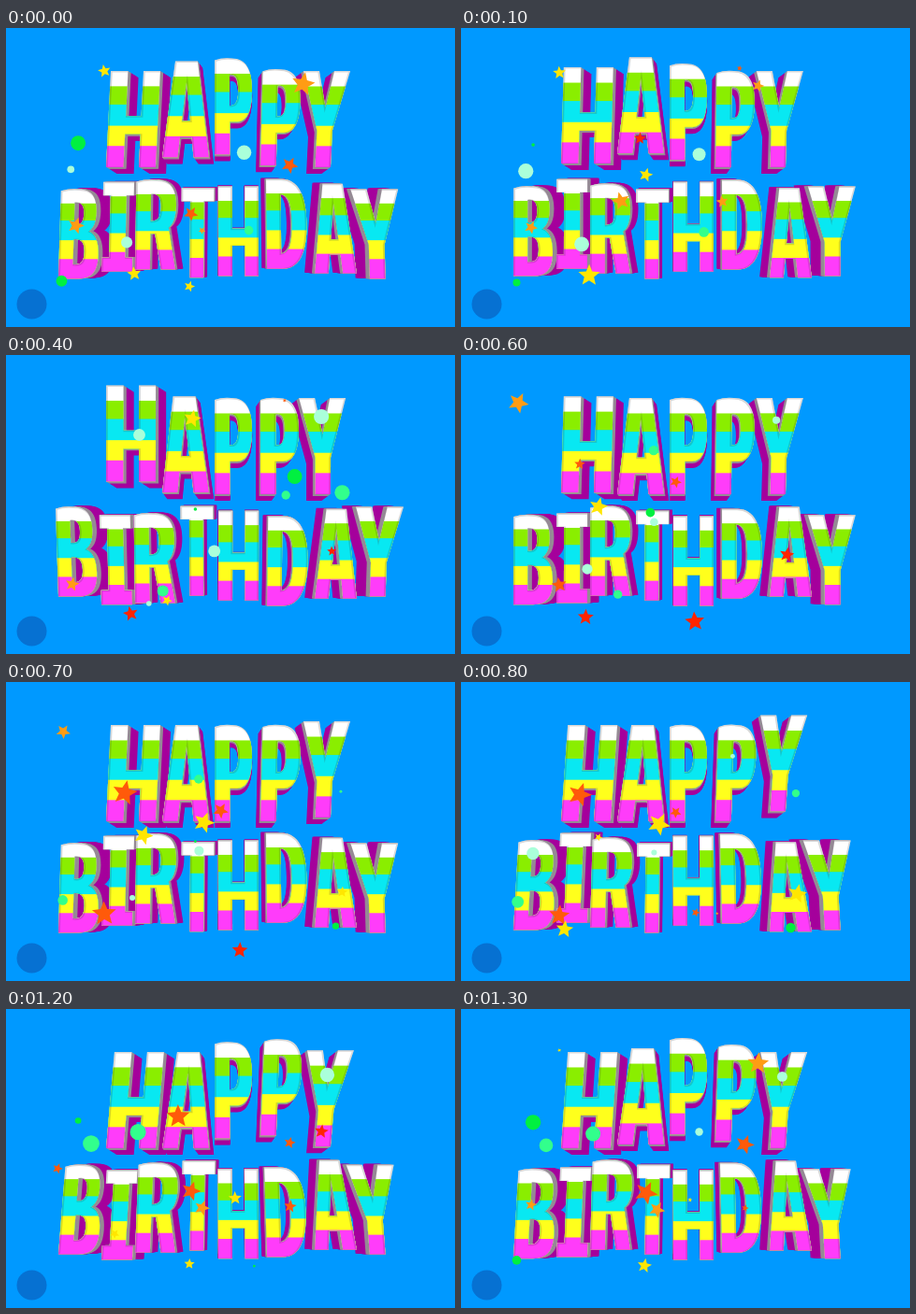
These frames come from a looping animation (480x320 px, 1.4 s). An HTML page with a canvas:

```html
<!DOCTYPE html>
<html>
<head>
<meta charset="utf-8">
<title>Happy Birthday</title>
<style>
html, body { margin: 0; width: 100%; height: 100%; overflow: hidden; background: #09f; }
canvas { display: block; }
</style>
</head>
<body>
<canvas id="stage" width="480" height="320" aria-label="Happy Birthday"></canvas>
<script>
const ctx = document.getElementById('stage').getContext('2d');
const { PI, cos, sin, abs } = Math;
const LOOP = 1400, STEP = 100;

// Letter outlines in a 100 x 100 box
const glyphs = {
  H: 'M0 0H35V47H66V0H100V100H66V66H35V100H0Z',
  A: 'M23 0H71L100 100H67L62 79H37L33 100H0ZM48 22L40 62H58Z',
  P: 'M0 2Q20 -1 45 0C85 0 100 12 100 33C100 55 85 66 60 66H41V100H0ZM40 17V49C58 50 63 43 63 33C63 20 55 16 40 17Z',
  Y: 'M0 0H34L51 38L66 0H100L68 62V100H35V62Z',
  B: 'M0 2Q20 -1 45 0C80 0 92 10 92 25C92 38 84 44 74 47C90 50 100 58 100 73C100 92 85 100 50 100H0ZM36 15V40C55 41 60 36 60 27C60 18 52 14 36 15ZM36 56V84C58 85 64 80 64 70C64 60 56 55 36 56Z',
  I: 'M0 0H100V15H76V84H100V100H0V84H24V15H0Z',
  R: 'M0 2Q20 -1 50 0C85 0 100 10 100 28C100 42 92 50 82 53L100 100H64L48 60H37V100H0ZM37 16V46C56 46 62 42 62 30C62 19 54 15 37 16Z',
  T: 'M0 0H100V15H69V100H27V15H0Z',
  D: 'M0 0H40C80 0 100 18 100 50C100 82 80 100 40 100H0ZM36 17V83C56 82 63 72 63 50C63 28 56 18 36 17Z'
};
for (const ch in glyphs) glyphs[ch] = new Path2D(glyphs[ch]);

// Each row: left edges, widths, resting top, height of the hop, lean of the top edge
const rows = [
  {
    text: 'HAPPY', xs: [107, 167, 223, 272, 313], ws: [53, 50, 40, 41, 50],
    y: 46, h: 103, hop: 15, once: true, depth: 7,
    lean: (i, mid, tilt) => 5 * abs(i - 2) * tilt
  },
  {
    text: 'BIRTHDAY', xs: [56, 102, 138, 187, 227, 279, 330, 371], ws: [42, 33, 43, 35, 43, 43, 45, 51],
    y: 172.5, h: 96, hop: 11, once: false, depth: -1,
    lean: (i, mid, tilt) => (238 - mid) * (0.075 * tilt - 0.02)
  }
];

const bands = [
  [-3, '#fff'], [16, '#8aee00'], [35, '#08e8f2'], [57, '#ffff1c'], [78, '#ff3cfa']
];
const discColors = ['#00f040', '#32ff8c', '#aaffda'];
const starColors = ['#ffe600', '#ff9c14', '#ff5a0a', '#ff2400'];

let seed = 11;
const random = () => (seed = seed * 16807 % 2147483647) / 2147483647;
const between = (a, b) => a + (b - a) * random();
const pick = list => list[Math.floor(random() * list.length)];

const confetti = Array.from({ length: 65 }, (_, i) => {
  const isStar = random() < 0.55;
  return {
    isStar,
    x: between(55, 360), y: between(40, 285),
    r: isStar ? between(7, 15) : between(4, 9),
    fill: pick(isStar ? starColors : discColors),
    turn: between(-0.4, 0.4),
    birth: i / 65 * LOOP
  };
});

function disc(x, y, r, fill) {
  ctx.fillStyle = fill;
  ctx.beginPath();
  ctx.arc(x, y, r, 0, 2 * PI);
  ctx.fill();
}

function star(x, y, r, turn, fill) {
  ctx.fillStyle = fill;
  ctx.beginPath();
  for (let i = 0; i < 10; i++) {
    const a = turn + i * PI / 5 - PI / 2;
    const d = i % 2 ? r * 0.45 : r;
    ctx.lineTo(x + d * cos(a), y + d * sin(a));
  }
  ctx.fill();
}

// The hop runs through each row from right to left
function lift(t, i, once) {
  const peak = 330 - 200 * i;
  const off = (t - peak + 2.5 * LOOP) % LOOP - LOOP / 2;
  return once && abs(off) > 350 ? 0 : (1 + cos(2 * PI * off / 700)) / 2;
}

function shapeRow(row, t, tilt) {
  return [...row.text].map((ch, i) => {
    const w = row.ws[i], mid = row.xs[i] + w / 2;
    const y = row.y - row.hop * lift(t, i, row.once);
    const lean = row.lean(i, mid, tilt);
    const path = new Path2D();
    path.addPath(glyphs[ch], new DOMMatrix([w / 100, 0, -lean / 100, row.h / 100, row.xs[i] + lean, y]));
    return { path, y, h: row.h, dx: (244 - mid) * 0.1, dy: row.depth };
  });
}

function extrude({ path, dx, dy }) {
  for (let d = 1; d > 0; d -= 0.06) {
    ctx.save();
    ctx.translate(dx * d, dy * d);
    ctx.fillStyle = d > 0.3 ? '#a5009c' : '#958a95';
    ctx.fill(path, 'evenodd');
    ctx.restore();
  }
}

function face({ path, y, h, dx }) {
  ctx.save();
  ctx.clip(path, 'evenodd');
  for (const [from, fill] of bands) {
    ctx.fillStyle = fill;
    ctx.fillRect(0, y + from * h / 100, 480, h);
  }
  // Soft bevel on the edge that turns towards the depth
  ctx.translate(dx > 0 ? 0.8 : -0.8, 0.5);
  ctx.strokeStyle = 'rgba(60,60,60,.2)';
  ctx.lineWidth = 2;
  ctx.stroke(path);
  ctx.restore();
}

function draw(now) {
  const t = Math.floor(now % LOOP / STEP) * STEP;
  const tilt = (1 - cos(2 * PI * (t - 350) / LOOP)) / 2;

  ctx.fillStyle = '#09f';
  ctx.fillRect(0, 0, 480, 320);
  const shapes = rows.flatMap(row => shapeRow(row, t, tilt));
  shapes.forEach(extrude);
  shapes.forEach(face);

  for (const { isStar, x, y, r, fill, turn, birth } of confetti) {
    const age = (t - birth + LOOP) % LOOP / 320;
    if (age >= 1) continue;
    const size = r * sin(PI * age) ** 0.5;
    if (isStar) star(x, y + 6 * age, size, turn + age * 0.4, fill);
    else disc(x, y + 6 * age, size, fill);
  }
  disc(27.5, 295.5, 16, '#0671d2');
  requestAnimationFrame(draw);
}
requestAnimationFrame(draw);
</script>
</body>
</html>
```
